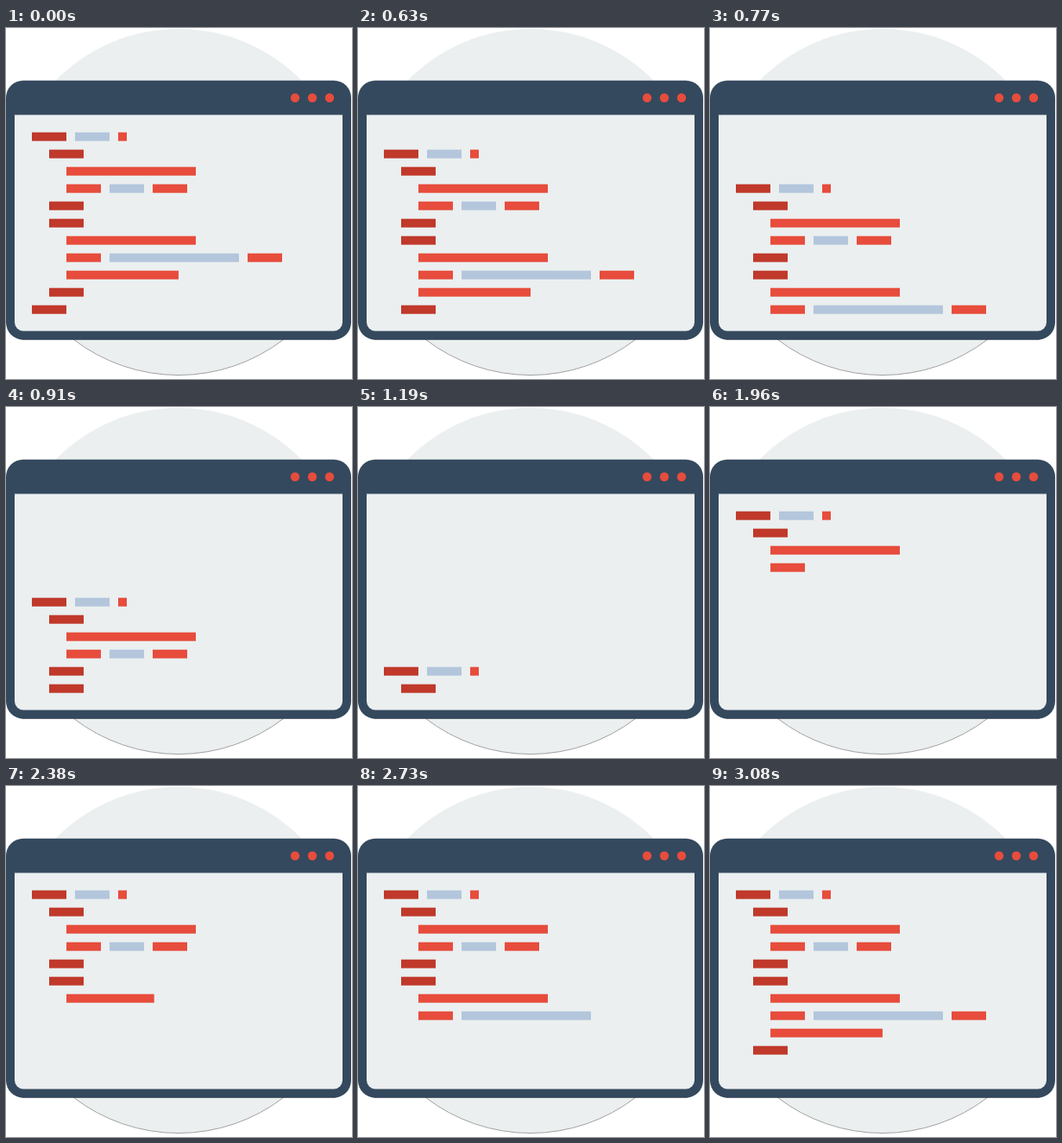
An HTML page that plays this animation: 401x406 px, repeating every 3.15 s.

```html
<!DOCTYPE html>
<html lang="en">
<head>
<meta charset="utf-8">
<title>Code window</title>
<style>
  html, body { margin: 0; width: 100%; height: 100%; overflow: hidden; background: #fff; }
  svg { display: block; width: 401px; height: 406px; }
</style>
</head>
<body>
<svg viewBox="0 0 401 406" xmlns="http://www.w3.org/2000/svg">
  <circle cx="200" cy="201" r="200" fill="#ebeff0"/>
  <path d="M78 360A200 200 0 0 0 322 360" fill="none" stroke="#777" stroke-width=".7"/>
  <rect y="60.7" width="400" height="299.8" rx="20" fill="#34495e"/>
  <path d="M18 360.3H382" stroke="#1f2d3b" stroke-width=".6"/>
  <path d="M10 100.5H390V340.5a10 10 0 0 1-10 10H20a10 10 0 0 1-10-10Z" fill="#ebeff0"/>
  <g fill="#e74c3c">
    <circle cx="335" cy="80.8" r="5.2"/>
    <circle cx="355" cy="80.8" r="5.2"/>
    <circle cx="375" cy="80.8" r="5.2"/>
  </g>
  <g id="code"></g>
</svg>
<script>
const LOOP = 3150, TICK = 70, HOLD_TICKS = 8, TYPE_TICK = 20;
const ROW_HEIGHT = 20, LAST_ROW = 10;
const DARK = '#c0392b', RED = '#e74c3c', BLUE = '#b3c6dc';

// Each bar: row, x, width, colour, in typing order.
const bars = [
  [0, 30, 40, DARK], [0, 80, 40, BLUE], [0, 130, 10, RED],
  [1, 50, 40, DARK],
  [2, 70, 150, RED],
  [3, 70, 40, RED], [3, 120, 40, BLUE], [3, 170, 40, RED],
  [4, 50, 40, DARK],
  [5, 50, 40, DARK],
  [6, 70, 150, RED],
  [7, 70, 40, RED], [7, 120, 150, BLUE], [7, 280, 40, RED],
  [8, 70, 130, RED],
  [9, 50, 40, DARK],
  [10, 30, 40, DARK]
];

const code = document.getElementById('code');
let nextTick = 0;
const items = bars.map(([row, x, width, fill]) => {
  const node = document.createElementNS('http://www.w3.org/2000/svg', 'rect');
  node.setAttribute('x', x);
  node.setAttribute('height', 10);
  node.setAttribute('fill', fill);
  code.append(node);
  // Long bars take three ticks to type, short ones a single tick.
  const ticks = width > 100 ? 3 : 1;
  const start = nextTick;
  nextTick += ticks;
  return { node, row, width, ticks, start };
});

function draw(time) {
  const tick = Math.floor((time % LOOP) / TICK);
  const typing = tick >= TYPE_TICK;
  const shift = typing ? 0 : Math.max(0, tick - HOLD_TICKS);
  const typed = typing ? tick - TYPE_TICK : nextTick;
  for (const { node, row, width, ticks, start } of items) {
    const line = row + shift;
    const part = Math.min(1, Math.max(0, (typed - start) / ticks));
    const partial = part > 0 && part < 1 ? 1.7 : 0;
    node.setAttribute('y', 120.7 + line * ROW_HEIGHT);
    node.setAttribute('width', line > LAST_ROW ? 0 : width * part + partial);
  }
}

const startTime = performance.now();
function loop() {
  draw(performance.now() - startTime);
  requestAnimationFrame(loop);
}
draw(0);
requestAnimationFrame(loop);
</script>
</body>
</html>
```
